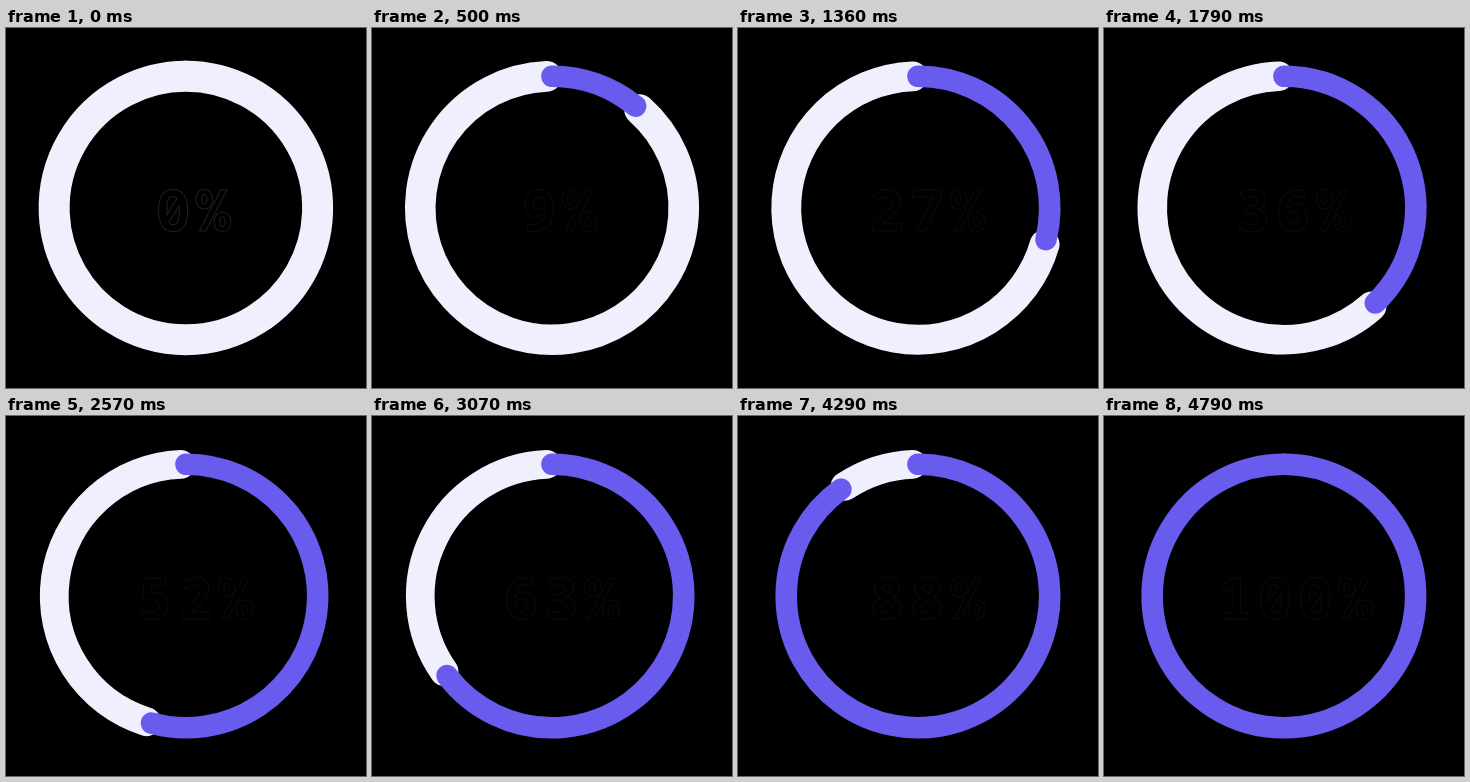
Write an HTML page that moves like this. It is 360 px wide and 360 px high and loops after 5000 ms.

```html
<!DOCTYPE html>
<html lang="en">
<head>
<meta charset="utf-8">
<title>Progress ring</title>
<style>
  html, body { margin: 0; width: 100%; height: 100%; overflow: hidden; background: #000; }
  svg { display: block; width: 100vw; height: 100vh; }
  path { fill: none; stroke-linecap: round; }
  text {
    font: 600 58px "Noto Sans Mono", "DejaVu Sans Mono", monospace;
    letter-spacing: 5.5px;
    text-anchor: middle;
    fill: #000;
    stroke-width: 1;
  }
</style>
</head>
<body>
<svg viewBox="0 0 360 360">
  <path id="rest" stroke="#f0effd"/>
  <path id="bar" stroke="#685bee" stroke-width="21.6"/>
  <text id="label" y="203"></text>
</svg>
<script>
const LOOP = 5000, FPS = 14, LAST = 67;
const C = 180, R = 131.75;
const [rest, bar, label] = ['rest', 'bar', 'label'].map(id => document.getElementById(id));

// Angles in degrees, clockwise from the top.
function point(deg) {
  const a = deg * Math.PI / 180;
  return (C + R * Math.sin(a)).toFixed(2) + ' ' + (C - R * Math.cos(a)).toFixed(2);
}

function arc(from, to) {
  if (to <= from) return '';
  const large = to - from > 180 ? 1 : 0;
  return `M${point(from)} A${R} ${R} 0 ${large} 1 ${point(to)}`;
}

function draw(t) {
  const step = Math.min(LAST, Math.floor((t % LOOP + 5) * FPS / 1000));
  const end = step ? Math.min(359.9, (step + 0.33) / LAST * 360) : 0;
  const value = step === LAST ? 100 : Math.round(Math.max(0, step - 1) / LAST * 100);
  const gap = Math.min(2.2, end);

  bar.setAttribute('d', arc(0, end));
  rest.setAttribute('d', arc(end + gap, 359.9 - gap));
  rest.setAttribute('stroke-width', Math.max(28.7, 31 - step * 0.06));

  const text = value + '%';
  label.textContent = text;
  label.setAttribute('x', 188 + 2 * (text.length - 1));
  label.setAttribute('stroke', step ? '#0b0b0d' : '#202020');
}

const start = performance.now();
function tick() {
  draw(performance.now() - start);
  requestAnimationFrame(tick);
}
tick();
</script>
</body>
</html>
```
